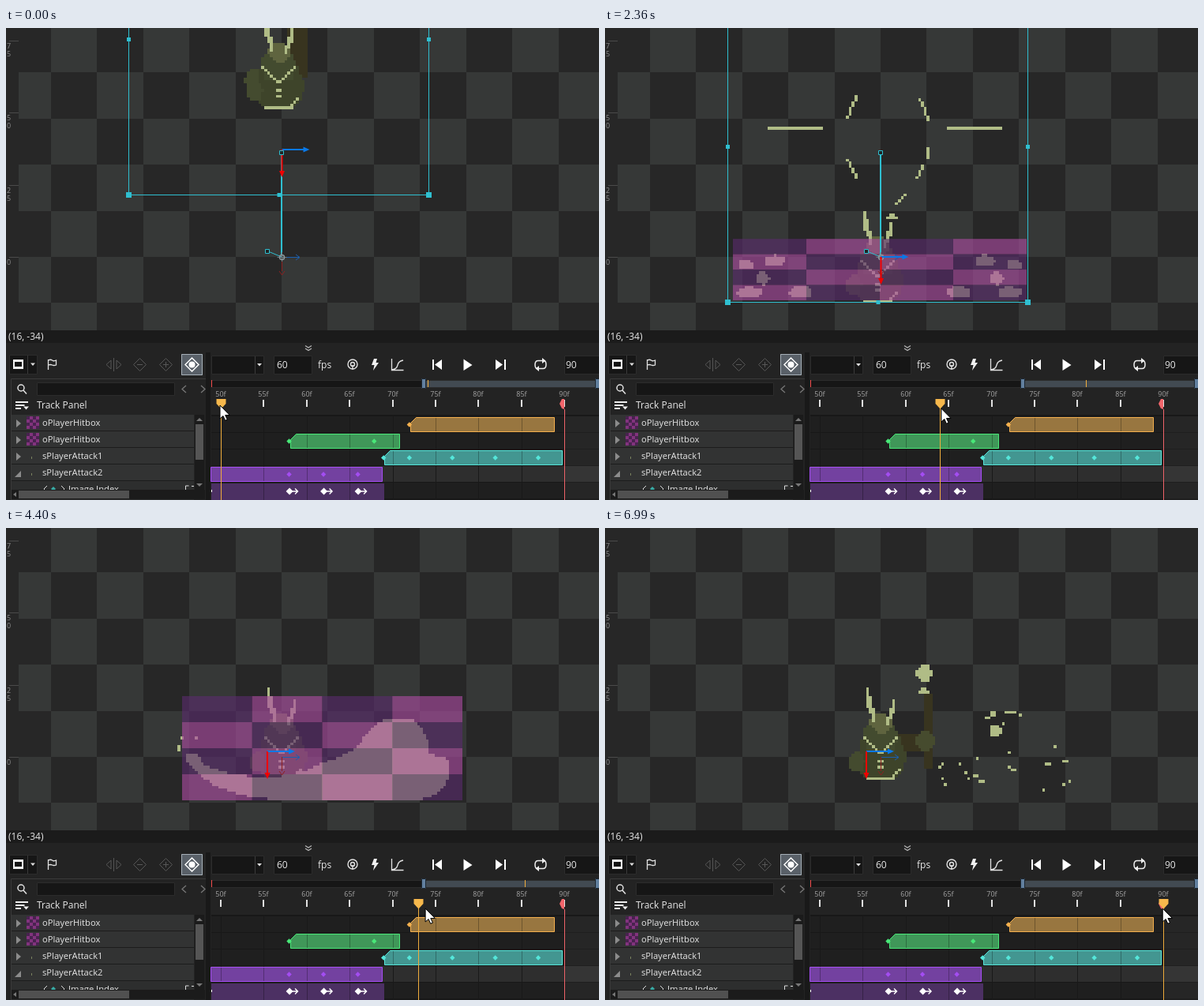
Write an HTML page with a canvas that moves like this. It is 751 px wide and 598 px high and loops after 7.65 s.

```html
<!DOCTYPE html>
<html>
<head>
<meta charset="utf-8">
<style>
  html, body { margin: 0; height: 100%; overflow: hidden; background: #232323; }
  canvas { display: block; }
</style>
</head>
<body>
<canvas id="stage" width="751" height="598"></canvas>
<script>
const ctx = document.getElementById('stage').getContext('2d');
const LOOP = 7650, UNIT = 3.656, OX = 349, OY = 290;
const LIME = '#b0bc86', TEAL = '#2fbfd0', BLUE = '#0a78e6', RED = '#f00000', ORANGE = '#f0ad3c';

// scrubbing: [time, timeline frame]
const scrub = [[180, 50], [1700, 60.8], [2490, 64.9], [3230, 68.6], [3470, 68.9],
  [4400, 73.9], [6510, 88.8], [6980, 90]];

function scrubAt(t) {
  const n = scrub.findIndex(k => k[0] > t);
  if (n < 1) return n ? 90 : 50;
  const [t0, f0] = scrub[n - 1], [t1, f1] = scrub[n];
  return f0 + (f1 - f0) * (t - t0) / (t1 - t0);
}
const frameX = f => 272 + (f - 50) * 10.88;

function random(seed) {
  return () => (seed = (seed * 16807) % 2147483647) / 2147483647;
}
function rect(x, y, w, h, color) { ctx.fillStyle = color; ctx.fillRect(x, y, w, h); }
function fill(d, color) { ctx.fillStyle = color; ctx.fill(new Path2D(d)); }
function line(d, color, width = 1) {
  ctx.strokeStyle = color; ctx.lineWidth = width; ctx.stroke(new Path2D(d));
}
function text(s, x, y, size = 12, color = '#e6e6e6', align = 'left') {
  ctx.font = size + 'px "Open Sans", sans-serif';
  ctx.fillStyle = color; ctx.textAlign = align; ctx.fillText(s, x, y);
}
const diamond = (x, y, r) => `M${x - r} ${y}l${r} ${-r} ${r} ${r} ${-r} ${r}z`;
const oval = (x, y, rx, ry) => `M${x - rx} ${y}a${rx} ${ry} 0 1 0 ${2 * rx} 0a${rx} ${ry} 0 1 0 ${-2 * rx} 0z`;

// ---- pixel art, described in stage coordinates and snapped to the sprite grid
const COLS = 122, ROWS = 97, SX = OX - 53 * UNIT, SY = OY - 80 * UNIT;

function sprite(draw) {
  const canvas = document.createElement('canvas');
  canvas.width = COLS; canvas.height = ROWS;
  const g = canvas.getContext('2d');
  draw({
    shape(d, color = LIME) {
      const p = new Path2D(d);
      g.fillStyle = color;
      for (let y = 0; y < ROWS; y++) for (let x = 0; x < COLS; x++)
        if (g.isPointInPath(p, SX + (x + .5) * UNIT, SY + (y + .5) * UNIT, 'evenodd')) g.fillRect(x, y, 1, 1);
    },
    bit(x, y, w = 1, h = 1) {
      g.fillStyle = LIME;
      g.fillRect(Math.floor((x - SX) / UNIT), Math.floor((y - SY) / UNIT), w, h);
    },
    dust(seed, count, x, y, w, h) {
      const rnd = random(seed);
      while (count--) this.bit(x + rnd() * w, y + rnd() * h, rnd() < .3 ? 2 : 1);
    },
    stamp(image, dx = 0, dy = 0) { g.drawImage(image, dx, dy); }
  });
  return canvas;
}

const body = sprite(s => {
  s.shape('M328 258H370L382 288L378 308L368 318H330L320 305L322 280z', '#3e442a');
  s.shape(oval(319, 297, 10, 13), '#444b2f');
  s.shape(oval(349, 250, 16, 15), '#5f643f');
  s.shape('M326 255L334 249L349 264L365 250L372 259L366 284H332z', '#434b2f');
  for (let i = 0; i < 3; i++) s.bit(332 + i * UNIT, 203 + i * 13, 1, 7 - i);
  for (let i = 0; i < 3; i++) s.bit(365 - i * UNIT, 218 + i * 12, 1, 5 - i);
  for (let i = 0; i < 5; i++) for (const side of [-1, 1])
    s.bit(349 + side * (20 - i * UNIT), 265 + i * UNIT);
  for (let y = 286; y < 310; y += 9) s.bit(347, y, 2, 1);
  s.bit(331, 316, 10);
  for (let i = 0; i < 3; i++) s.bit(367 + i * UNIT, 314 - i * UNIT);
});

// half width of the almond-shaped slash
const bulge = (y, top, bottom, r) => r * Math.max(0, Math.sin(Math.PI * (y - top) / (bottom - top))) ** .8;
function almond(top, bottom, r) {
  let left = '', right = '';
  for (let y = top; y <= bottom; y += UNIT) {
    const w = bulge(y, top, bottom, r);
    left += `L${362 - w} ${y}`;
    right = `L${362 + w} ${y}` + right;
  }
  return `M362 ${top}${left}${right}z`;
}
// what is left of the slash: pieces of its outline and of the cross bar
function remains(s, amount) {
  for (const [side, mid, half] of [[-1, 102, 14], [-1, 178, 12], [1, 106, 14], [1, 159, 6], [1, 185, 9], [1, 219, 7]])
    for (let y = mid - half * amount; y <= mid + half * amount; y += UNIT)
      s.bit(358 + side * bulge(y, 45, 232, 54), y);
  const bar = 2 + Math.round(17 * amount);
  s.bit(207, 127, bar);
  s.bit(503 - bar * UNIT, 127, bar);
  s.bit(361, 236, 2);
  s.bit(357, 239, 4);
}

const art = {
  leap: sprite(s => {
    s.shape('M358 110H382V198H358z', '#38341f');
    s.shape(oval(313, 202, 10, 15), '#444b2f');
    s.stamp(body, -1, -22);
  }),
  slam: sprite(s => {
    s.stamp(body, -1, 7);
    s.shape('M178 346Q162 338 162 320Q166 297 200 293H218Q224 303 238 299Q252 296 266 305Q276 317 290 317Q304 325 322 319Q336 309 352 317Q372 300 386 309Q404 321 420 309Q442 299 464 292Q486 284 504 296Q521 304 521 323Q519 341 506 346z');
    s.shape(almond(45, 232, 54) + almond(68, 200, 24));
    s.shape('M355 203H371L364 229z');
    s.bit(362, 0, 1, 54);
    s.bit(270, 127, 52);
    s.bit(360, 236, 2);
  }),
  fade: sprite(s => {
    s.stamp(body, -1, 8);
    remains(s, 1);
    for (const [dx, y, rx, ry] of [[170, 300, 10, 6], [133, 295, 13, 7], [148, 317, 9, 8], [165, 335, 16, 7], [100, 335, 15, 8]])
      for (const x of [348 - dx, 348 + dx]) s.shape(oval(x, y, rx, ry));
  }),
  ash: sprite(s => {
    s.stamp(body, -1, 8);
    remains(s, .1);
    s.dust(7, 18, 164, 293, 104, 50);
    s.dust(23, 18, 423, 286, 104, 57);
  }),
  windup: sprite(s => s.stamp(body)),
  wave: sprite(s => {
    s.stamp(body);
    s.shape('M228 285H241L250 298Q273 313 311 314Q365 318 398 299Q443 286 455 263Q468 243 489 242H512Q537 256 536 287L560 292L562 314Q554 339 524 344H340Q265 338 239 306L229 295z');
    s.bit(218, 276, 1, 2);
    s.bit(222, 268);
    s.bit(240, 268);
  }),
  swirl: sprite(s => {
    s.stamp(body);
    s.shape('M400 312Q455 298 477 284Q501 276 498 269Q478 266 477 252Q483 235 508 236Q540 243 540 270Q529 304 489 310Q449 316 400 312z');
    s.shape('M312 340Q430 341 488 326Q535 314 544 298Q554 286 568 286L582 293Q592 308 578 325Q553 344 490 346H394z');
    s.dust(5, 8, 215, 265, 60, 62);
  }),
  spray: sprite(s => {
    s.stamp(body);
    s.shape(oval(507, 250, 20, 14));
    s.shape('M480 333Q545 323 566 296L579 294L584 309Q565 337 502 342z');
    s.dust(11, 12, 425, 278, 160, 56);
  }),
  rest: sprite(s => {
    s.shape('M372 262H403V210H413V305H405V283H376z', '#38341f');
    s.shape(oval(406, 270, 13, 12), '#464b2e');
    s.stamp(body);
    s.shape(oval(404, 184, 10, 11));
    s.bit(401, 203, 2);
    s.bit(398, 206, 4);
    s.shape(oval(494, 257, 8, 7));
    s.dust(3, 7, 482, 232, 56, 26);
    s.dust(11, 20, 425, 278, 164, 56);
  })
};
// each picture shows until its end frame
const cels = [[58, 'leap'], [62, 'slam'], [66, 'fade'], [69, 'ash'], [72, 'windup'],
  [77, 'wave'], [82, 'swirl'], [87, 'spray'], [91, 'rest']];

// ---- viewport
function hitbox(l, t, r, b) {
  const w = (r - l) / 4, h = (b - t) / 4;
  for (let i = 0; i < 16; i++) {
    const x = i % 4, y = i >> 2;
    rect(l + x * w, t + y * h, w, h, (x + y) % 2 ? 'rgba(170,75,160,.63)' : 'rgba(89,44,108,.63)');
  }
}
function gizmo(x, y) {
  line(`M${x} ${y}h28`, BLUE, 2);
  fill(`M${x + 27} ${y - 3.5}l8 3.5 -8 3.5z`, BLUE);
  line(`M${x} ${y}v28`, RED, 2);
  fill(`M${x - 3.5} ${y + 27}l3.5 8 3.5 -8z`, RED);
}
function handle(x, y, s) { rect(x - s / 2, y - s / 2, s, s, TEAL); }
function joint(x, y) { rect(x - 3, y - 3, 6, 6, '#202424'); line(`M${x - 2.5} ${y - 2.5}h5v5h-5z`, TEAL); }

function viewport(f) {
  const cell = 16 * UNIT;
  for (let r = -5; r < 2; r++) for (let c = -6; c < 7; c++)
    rect(Math.round(OX + c * cell), Math.round(OY + r * cell), 59, 59, (r + c) % 2 ? '#272727' : '#363837');
  rect(0, 0, 16, 383, '#272727');
  ['0', '25', '50', '75'].forEach((label, n) => {
    const y = Math.round(OY - n * 25 * UNIT);
    rect(4, y, 12, 1, '#4a4a4a');
    [...label].forEach((ch, i) => text(ch, 1, y + 10 + 9.5 * i, 9, '#8c8c8c'));
  });

  const drop = f < 58 ? -17 * (58 - f) : 0;
  ctx.imageSmoothingEnabled = false;
  ctx.drawImage(art[cels.find(c => f < c[0])[1]], SX, SY + drop, COLS * UNIT, ROWS * UNIT);

  if (f >= 58 && f < 71) {
    const g = Math.min(f, 68) - 58;
    hitbox(217 - 9.17 * g, 239 + 4.7 * g, 483 + 8.5 * g, 345);
  }
  if (f >= 72 && f < 89) hitbox(223, 213, 578, 345);

  // resting axes at the origin
  line('M349 290.5h22M367 287l5 3.5 -5 3.5', '#1c5fae');
  line('M349.5 290v18M346 308l3.5 5 3.5 -5', '#8e2020');

  if (f >= 69) { gizmo(331, 283); return; }
  const bottom = 347.5 + drop;
  line(`M155.5 0V${bottom}H535.5V0`, TEAL);
  for (const x of [155.5, 535.5]) { handle(x, bottom, 7); handle(x, 150.5 + drop, 5); }
  handle(346, bottom, 5);
  line('M349 160V288', TEAL, 2);
  line('M349 290L332 283', TEAL);
  line('M343.5 290.5h12M349.5 284v12', '#707c80');
  line(oval(349.5, 290.5, 3, 3), '#8c989c', 1.5);
  gizmo(349.5, 290 + drop);
  joint(349, 158);
  joint(331, 283);
}

// ---- panels
function field(x, y, w, h) {
  rect(x, y, w, h, '#161616');
  line(`M${x + .5} ${y + .5}h${w - 1}v${h - 1}h${1 - w}z`, '#2c2c2c');
}

function toolbar() {
  rect(0, 383, 751, 215, '#232323');
  rect(0, 383, 751, 16, '#1b1b1b');
  text('(16, -34)', 3, 395);
  line('M379 402.5l4 2.5 4 -2.5M379 406l4 2.5 4 -2.5', '#b8b8b8', 1.2);

  field(4, 414, 36, 25);
  rect(27, 415, 1, 23, '#3a3a3a');
  rect(9, 420, 13, 12, '#f2f2f2');
  rect(11, 423, 9, 6, '#151515');
  fill('M31 424.5h6l-3 3.5z', '#ddd');
  line('M53.5 420v13M53.5 421q3 -1.5 5 0t5 0v6q-3 1 -5 0t-5 0', '#e2e2e2', 1.3);
  line('M136.5 418v17M133 421l-6 5.5 6 5.5zM140 421l6 5.5 -6 5.5z', '#575757');
  line(diamond(169.5, 426.5, 8) + 'M166 426.5h7', '#575757');
  line(diamond(202.5, 426.5, 8) + 'M199 426.5h7M202.5 423v7', '#575757');
  rect(222, 413, 27, 27, '#596068');
  line('M222.5 413.5h26v26h-26z', '#a6b0b8');
  line(diamond(235.5, 426.5, 8.5), '#fff', 1.5);
  fill(oval(235.5, 426.5, 4, 4), '#fff');

  rect(253, 411, 6, 187, '#191919');
  field(260, 415, 67, 24);
  rect(315, 416, 1, 22, '#3a3a3a');
  fill('M318 425h6l-3 3.5z', '#ddd');
  field(339, 415, 49, 24);
  text('60', 343, 431);
  text('fps', 395, 431);
  line(oval(439, 426, 6, 6) + oval(439, 426, 2.5, 2.5) + 'M439 427v6', '#e2e2e2', 1.4);
  fill('M466 419h4l-1.5 5h3.5l-7 10 1.5 -7h-3.5z', '#f2f2f2');
  line('M488.5 419v14.5h15M489 433q6 -1 7 -6t7 -6', '#e2e2e2', 1.3);
  fill('M540 420h2v13h-2zM552 420v13l-9 -6.5z', '#fff');
  fill('M579.5 419.5v14.5l11 -7z', '#fff');
  fill('M631 420h2v13h-2zM620 420v13l9 -6.5z', '#fff');
  line('M673 431.5q-3 0 -3 -5t4 -5h7M681 421.5q3 0 3 5t-4 5h-6', '#eee', 1.5);
  fill('M679 418l4.5 3.5 -4.5 3.5zM675 428l-4.5 3.5 4.5 3.5z', '#eee');
  field(707, 415, 45, 24);
  text('90', 709, 431);
}

function trackPanel() {
  line('M6.5 598V444.5H253', '#3a3a3a');
  line(oval(19, 456, 4, 4) + 'M22 459l4 4.5', '#e2e2e2', 1.5);
  field(39, 449, 175, 17);
  line('M228 453l-5 4.5 5 4.5M247 453l5 4.5 -5 4.5', '#777', 1.3);
  for (let i = 0; i < 3; i++) rect(12, 473 + 4 * i, 16 - 4.5 * i, 2, '#eee');
  fill('M22 479.5h7l-3.5 4z', '#eee');
  text('Track Panel', 39, 482);

  ['oPlayerHitbox', 'oPlayerHitbox', 'sPlayerAttack1', 'sPlayerAttack2'].forEach((name, i) => {
    const y = 490 + 21 * i, open = i === 3;
    rect(7, y, 231, 20, '#323333');
    rect(7, y + 20, 231, 1, '#1c1c1c');
    fill(open ? `M19 ${y + 8}v8h-8z` : `M13 ${y + 6}l6 5 -6 5z`, '#8c8c8c');
    if (i < 2) for (let n = 0; n < 16; n++)
      rect(26 + n % 4 * 4, y + 2 + (n >> 2) * 4, 4, 4, (n + (n >> 2)) % 2 ? '#82337e' : '#48234f');
    else rect(32, y + 11, 1, 3, '#7b835f');
    text(name, 46, y + 14, 11.2);
  });
  rect(7, 574, 231, 24, '#2d2e2e');
  text('Image Index', 79, 588, 11.2);
  line('M52 580l-4 4 4 4M70 580l4 4 -4 4M227.5 586v-6h4M235 580.5h3', '#ddd');
  fill(diamond(60, 584, 3), '#38aaa4');
  rect(7, 585, 245, 12, '#1b1b1b');
  rect(16, 586, 140, 10, '#505050');
  rect(239, 490, 12, 95, '#1b1b1b');
  rect(240, 502, 10, 45, '#555');
  fill('M13 588v6l-4 -3zM241 498h8l-4 -4zM241 577h8l-4 4z', '#777');
}

function clip(x, y, w, color, edge, keys, cut = 7) {
  const d = `M${x + .5} ${y + 18.5}v${cut - 18}l${cut} ${-cut}H${x + w - .5}v18z`;
  fill(d, color);
  for (let f = 50; f < 90; f += 5) {
    const gx = Math.round(frameX(f));
    if (gx > x + 3 && gx < x + w) rect(gx, y + 1, 1, 17, 'rgba(0,0,0,.28)');
  }
  line(d, edge);
  keys.forEach(k => fill(diamond(frameX(k) - .5, y + 9.5, 3.2), edge));
}

function timeline(f) {
  field(260, 446, 492, 10);
  rect(530, 447, 221, 8, '#424a52');
  rect(260, 446, 1, 9, '#f04848');
  rect(Math.round(533.5 + 5.39 * (f - 50)), 446, 1, 9, ORANGE);
  for (const x of [526, 746]) {
    rect(x, 444, 6, 13, '#62809f');
    line(`M${x + .5} 444.5h5v12h-5z`, '#1d2731');
  }
  rect(260, 490, 491, 108, '#181818');
  for (let i = 0; i < 5; i++) rect(260, 492 + 21 * i, 491, 20, i === 3 ? '#2e2e2e' : '#1f1f1f');
  rect(709, 492, 42, 106, 'rgba(255,255,255,.03)');
  for (let m = 50; m <= 90; m += 5) {
    const x = Math.round(frameX(m));
    text(m + 'f', x, 467, 9, '#a4a4a4', 'center');
    rect(x - 1, 471, 2, 9, '#e0e0e0');
    rect(x, 492, 1, 106, '#191919');
  }
  clip(512, 493, 183, '#987640', '#f5b04e', [72]);
  clip(360, 514, 139, '#409759', '#48e878', [58, 67.9]);
  clip(479, 535, 226, '#439691', '#55e6da', [69, 72, 77, 82, 87]);
  clip(259, 556, 218, '#7341a0', '#a44df2', [58, 62, 66], 0);
  rect(260, 577, 219, 21, '#4c3063');
  for (let m = 55; m < 70; m += 5) rect(Math.round(frameX(m)), 577, 1, 21, 'rgba(0,0,0,.28)');
  rect(260, 585, 1, 3, '#fff');
  for (const k of [58, 62, 66]) {
    const x = frameX(k);
    fill(diamond(x, 587, 4.5), '#fff');
    line(`M${x + 3} 587h7M${x + 7} 583.5l3.5 3.5 -3.5 3.5`, '#fff', 1.4);
  }

  fill('M707 470h-3l-3 6 3 6 3 1z', '#f2656b');
  rect(707, 483, 1, 115, '#f2656b');
  const x = Math.round(frameX(f));
  rect(x, 480, 1, 118, ORANGE);
  fill(`M${x - 5.5} 470h12v6l-6 6.5 -6 -6.5z`, '#f6b84c');
}

function pointer(x, y) {
  const d = `M${x} ${y}v17l4 -3.5 2.6 5.8 2.7 -1.2 -2.6 -5.6h5.5z`;
  fill(d, '#fff');
  line(d, '#000');
}

function render(now) {
  const position = scrubAt(now % LOOP), f = Math.floor(position);
  viewport(f);
  toolbar();
  trackPanel();
  timeline(f);
  pointer(frameX(position) - 1, 478 + Math.min(4, position - 50));
  requestAnimationFrame(render);
}
requestAnimationFrame(render);
</script>
</body>
</html>
```
